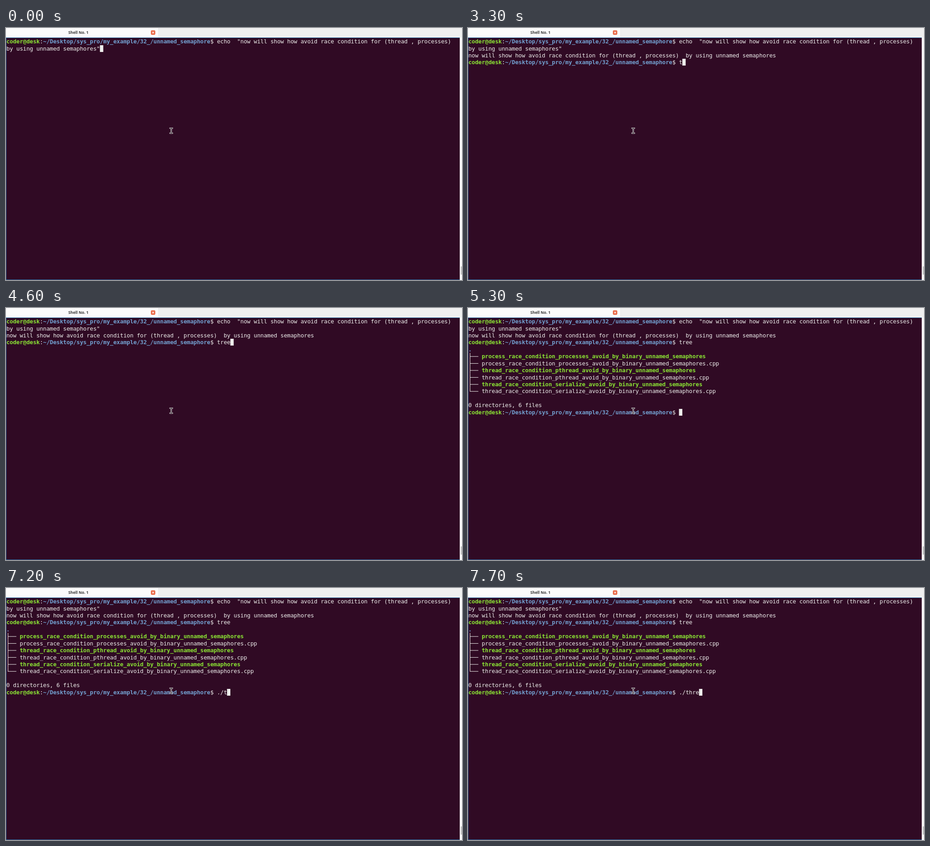
Animation, 1006 px wide and 557 px high, one loop 8000 ms. Source, as an HTML page with a canvas:

```html
<!DOCTYPE html>
<html lang="en">
<head>
<meta charset="utf-8">
<title>Shell</title>
<style>
  html, body { margin: 0; width: 100%; height: 100%; overflow: hidden; background: #300a24; }
  canvas { display: block; }
</style>
</head>
<body>
<canvas id="stage" width="1006" height="557"></canvas>
<script>
const ctx = document.getElementById('stage').getContext('2d');
const WIDTH = 1006, HEIGHT = 557, LOOP = 8000;

// The terminal is laid out on an 11 x 23 cell grid and shown reduced.
const SCALE = WIDTH / 1500, CELL_W = 11, CELL_H = 23, LEFT = 1, TOP = 33, ASCENT = 18;
const FG = '#eeeeec', GREEN = '#8ae234', BLUE = '#729fcf', BACK = '#300a24', EDGE = '#2d78b0';
const MONO = '18.67px "DejaVu Sans Mono", monospace';

const MESSAGE = 'now will show how avoid race condition for (thread , processes)';
const TAIL = 'by using unnamed semaphores';
const PATH = '~/Desktop/sys_pro/my_example/32_/unnamed_semaphore';
const FILES = ['process_race_condition_processes', 'thread_race_condition_pthread', 'thread_race_condition_serialize']
  .map(name => name + '_avoid_by_binary_unnamed_semaphores');

const ENTER_ECHO = 500, ENTER_TREE = 5300;
const TREE_KEYS = [3300, 3500, 3600, 4600];
const RUN_KEYS = [6400, 6700, 7200, 7300, 7500, 7700];

const typed = (text, keys, t) => text.slice(0, keys.filter(key => t >= key).length);

function rect(color, x, y, w, h) {
  ctx.fillStyle = color;
  ctx.fillRect(x, y, w, h);
}

function write(text, col, row, color = FG, bold = false) {
  ctx.save();
  ctx.scale(SCALE, SCALE);
  ctx.font = (bold ? 'bold ' : '') + MONO;
  ctx.textAlign = 'left';
  ctx.fillStyle = color;
  [...text].forEach((char, i) => {
    if (char !== ' ') ctx.fillText(char, LEFT + (col + i) * CELL_W, TOP + row * CELL_H + ASCENT);
  });
  ctx.restore();
  return col + text.length;
}

function prompt(row, command) {
  let col = write('coder@desk', 0, row, GREEN, true);
  col = write(':', col, row);
  col = write(PATH, col, row, BLUE, true);
  return write('$ ' + command, col, row);
}

function cursor(col, row) {
  const x = (LEFT + col * CELL_W) * SCALE;
  rect(FG, x, Math.round(22.2 + row * CELL_H * SCALE), CELL_W * SCALE, 15);
}

function branch(row, last) {
  const y = TOP + row * CELL_H, x = LEFT + 5, line = 1.5;
  ctx.save();
  ctx.scale(SCALE, SCALE);
  rect(FG, x, y, line, last ? 12 : CELL_H);
  rect(FG, x, y + 11, LEFT + 3 * CELL_W - x, line);
  ctx.restore();
}

function tree(row) {
  write('.', 0, row++, BLUE, true);
  FILES.forEach((name, i) => {
    branch(row, false);
    write(name, 4, row++, GREEN, true);
    branch(row, i === FILES.length - 1);
    write(name + '.cpp', 4, row++);
  });
  write('0 directories, 6 files', 0, row + 1);
}

function strokeLines(color, width, lines) {
  ctx.strokeStyle = color;
  ctx.lineWidth = width;
  ctx.beginPath();
  for (const [x1, y1, x2, y2] of lines) {
    ctx.moveTo(x1, y1);
    ctx.lineTo(x2, y2);
  }
  ctx.stroke();
}

function pointer() {
  const beam = [[362, 221.5, 367, 221.5], [364.5, 221.5, 364.5, 232.5], [362, 232.5, 367, 232.5]];
  ctx.lineCap = 'square';
  strokeLines('#f4f4f4', 2.7, beam);
  strokeLines('#16060f', 1, beam);
  ctx.lineCap = 'butt';
}

function tabBar() {
  rect('#f0f0f0', 0, 0, WIDTH, 21);
  rect('#fbfbfb', 0, 0, 336, 21);
  rect('#e4e4e4', 336, 0, 0.7, 21);
  ctx.font = 'bold 8.5px "Noto Sans", sans-serif';
  ctx.textAlign = 'center';
  ctx.fillStyle = '#363636';
  ctx.fillText('Shell No. 1', 159.8, 13.2);
  ctx.fillStyle = '#e8623f';
  ctx.beginPath();
  ctx.roundRect(319.7, 5.3, 9.6, 9.6, 1.8);
  ctx.fill();
  strokeLines('#fff', 1.2, [[322.5, 8.1, 326.5, 12.1], [326.5, 8.1, 322.5, 12.1]]);
}

function windowFrame() {
  rect(BACK, 0, 21, WIDTH, HEIGHT - 21);
  rect(EDGE, 0, 21, 1001, 1);
  rect(EDGE, 0, 21, 0.8, HEIGHT - 21);
  rect(EDGE, 0, HEIGHT - 1, 1001, 1);
  rect('#fafafa', 1001, 21, 5, HEIGHT - 21);
  rect('#c6c6c6', 1003, 527, 3, 18);
}

function draw(t) {
  windowFrame();
  tabBar();
  prompt(0, 'echo  "' + MESSAGE);
  let row = 1, col = write(TAIL + '"', 0, row);
  if (t >= ENTER_ECHO) {
    write(MESSAGE + '  ' + TAIL, 0, 2);
    row = 3;
    col = prompt(row, typed('tree', TREE_KEYS, t));
  }
  if (t >= ENTER_TREE) {
    tree(4);
    row = 13;
    col = prompt(row, typed('./thre', RUN_KEYS, t));
  }
  cursor(col, row);
  pointer();
}

const start = performance.now();
function tick() {
  draw((performance.now() - start) % LOOP);
  requestAnimationFrame(tick);
}
tick();
</script>
</body>
</html>
```
